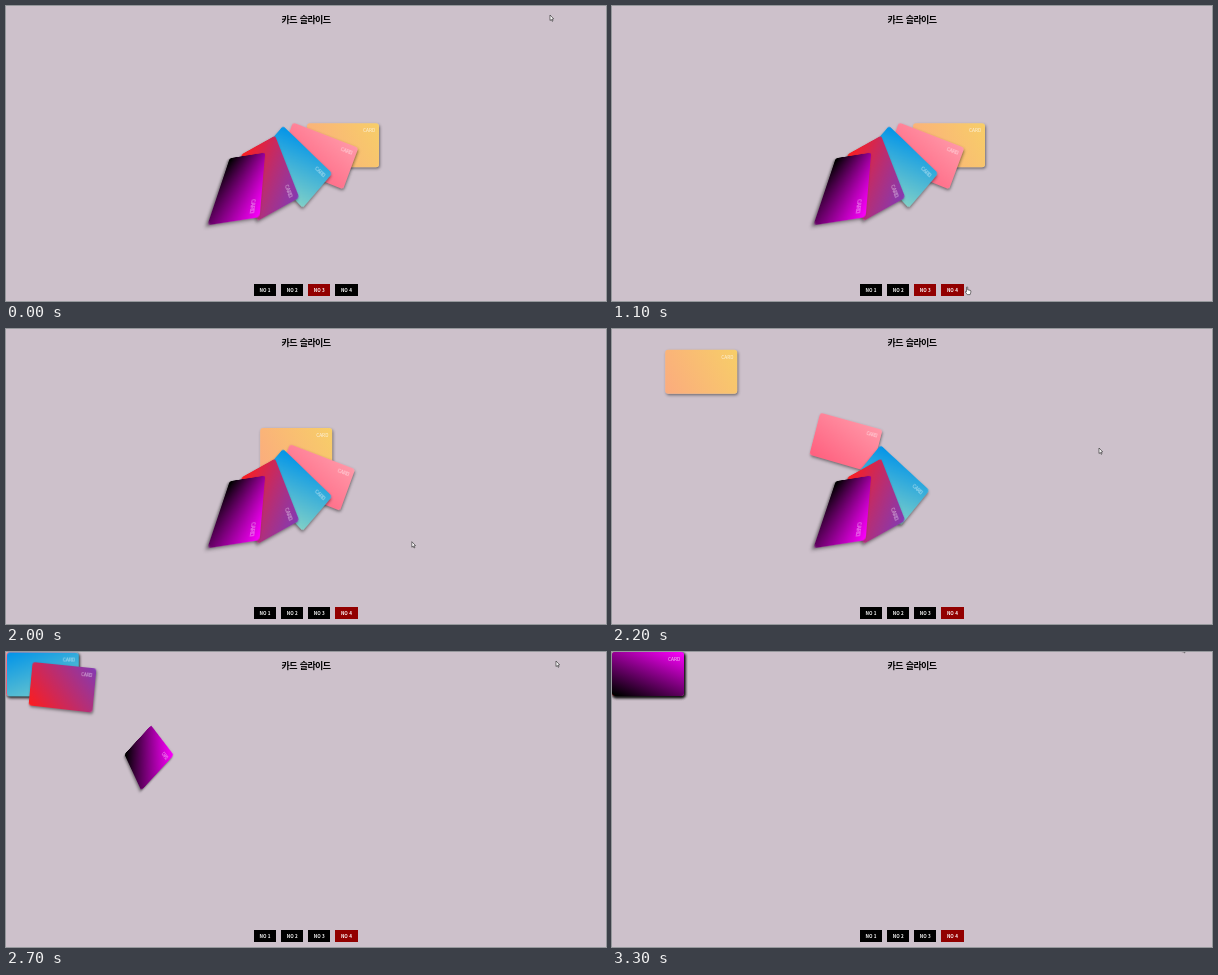
These frames come from a looping animation (600x295 px, 4000 ms). An HTML page:

```html
<!DOCTYPE html>
<html lang="ko">
<head>
<meta charset="utf-8">
<title>카드 슬라이드</title>
<style>
  html, body { margin: 0; width: 100%; height: 100%; overflow: hidden; background: #cdc1cb; }
  #stage { position: absolute; left: 0; top: 0; width: 600px; height: 295px; overflow: hidden; }
  h1 {
    position: absolute; left: 0; top: 7px; width: 600px; margin: 0; text-align: center;
    font: 700 9px/14px "Noto Sans CJK KR", "Noto Sans CJK", sans-serif;
    letter-spacing: -.6px; word-spacing: 1px; color: #000;
  }
  .card {
    position: absolute; left: 0; top: 0; width: 72px; height: 44px; border-radius: 3px;
    box-shadow: 1px 1.5px 3px rgba(0, 0, 0, .45);
  }
  .card span {
    position: absolute; right: 3.7px; top: 3.3px; color: rgba(255, 255, 255, .75);
    font: 300 4.8px/7px "Noto Sans CJK KR", "Noto Sans CJK", sans-serif;
  }
  .button {
    position: absolute; top: 277.7px; width: 22.4px; height: 12.4px; background: #000; color: #fff;
    font: 900 4.6px/12.4px "Noto Sans CJK KR", "Noto Sans CJK", sans-serif; text-align: center;
  }
  .button.on { background: #920000; }
  svg { position: absolute; left: 0; top: 0; }
</style>
</head>
<body>
<div id="stage">
  <h1>카드 슬라이드</h1>
  <svg width="600" height="295">
    <g id="cursor" fill="#fff" stroke="#222" stroke-width=".6" stroke-linejoin="round">
      <path id="arrow" d="M0 0V5.5L1.3 4.4 2.2 6.3 3 5.9 2.1 4.1 3.7 3.9Z"/>
      <path id="hand" d="M0 .4Q.6-.4 1.2.4V3L4 3.6Q4.6 4 4.3 5.4L3.6 7.8H.8L-1.2 5.2Q-1.2 4.2 0 4.8Z"/>
    </g>
  </svg>
</div>
<script>
const LOOP = 4000, STEP = 100, CLICK = 1700, HOVER = 1100, LEAVE = 1850;
const MOVE = { start: 1690, stagger: 150, duration: 830 };
const W = 72, H = 44;

const fills = [
  'linear-gradient(62deg, #fbab7e, #f7ce68)',
  'linear-gradient(20deg, #ff5f7e, #ff98a8)',
  'linear-gradient(160deg, #0093e9, #80d0c7)',
  'linear-gradient(45deg, #fd1d1d, #833ab4)',
  'linear-gradient(22deg, #000 4%, #f0f)',
];

const pointer = [
  { t: 0, x: 544, y: 9 },
  { t: 600, x: 402, y: 270 },
  { t: 1200, x: 345, y: 283 },
  { t: LEAVE, x: 345, y: 283 },
  { t: 2200, x: 487, y: 119 },
  { t: 2400, x: 533, y: 43 },
  { t: 2700, x: 550, y: 9 },
  { t: 3300, x: 570, y: -5.4 },
];

const stage = document.getElementById('stage');
const svg = stage.querySelector('svg');
const byId = id => document.getElementById(id);
const lerp = (a, b, p) => a + (b - a) * p;
const clamp = v => Math.min(1, Math.max(0, v));
const radians = degrees => degrees * Math.PI / 180;
const easeInOutQuart = u => u < .5 ? 8 * u ** 4 : 1 - 8 * (1 - u) ** 4;

function addBox(className) {
  const box = document.createElement('div');
  box.className = className;
  stage.insertBefore(box, svg);
  return box;
}

const cards = fills.map(fill => {
  const card = addBox('card');
  card.style.background = fill;
  card.innerHTML = '<span>CARD</span>';
  return card;
});

const buttons = [1, 2, 3, 4].map((n, i) => {
  const button = addBox('button');
  button.style.left = 247.9 + i * 27.1 + 'px';
  button.textContent = 'NO ' + n;
  return button;
});

// Card i starts fanned out by its index and flattens into the corner as p goes to 1.
function placeCard(card, i, p) {
  const left = 1 - p;
  const x = lerp(337 - 25.3 * i, W / 2, p);
  const y = lerp(139.3 + 10.5 * i - .33 * i * i, H / 2, p);
  const spin = 20.3 * i * left;
  const lean = 1.3 * i * i * (1 - p ** 3) ** 2;
  const ax = radians(spin + lean), ay = radians(spin);
  const sx = 1 - .025 * i * left - .42 * i * p * left;
  const sy = 1 - .007 * i * left;
  const depth = .024 * i * i * left;
  const matrix = [
    sx * Math.cos(ax), sx * Math.sin(ax), 0, -depth / W,
    -sy * Math.sin(ay), sy * Math.cos(ay), 0, 0,
    0, 0, 1, 0,
    0, 0, 0, 1,
  ].map(v => v.toFixed(6));
  card.style.transform = `translate(${x - W / 2}px, ${y - H / 2}px) matrix3d(${matrix})`;
}

function pointerAt(t) {
  const next = pointer.findIndex(key => key.t > t);
  const b = pointer.at(next);
  if (next < 0) return [b.x, b.y];
  const a = pointer[next - 1];
  const p = (t - a.t) / (b.t - a.t);
  return [lerp(a.x, b.x, p), lerp(a.y, b.y, p)];
}

function draw(t) {
  cards.forEach((card, i) => {
    const u = clamp((t - MOVE.start - i * MOVE.stagger) / MOVE.duration);
    placeCard(card, i, easeInOutQuart(u));
  });
  buttons[2].classList.toggle('on', t < CLICK);
  buttons[3].classList.toggle('on', t >= HOVER);
  const pointing = t >= HOVER && t < LEAVE;
  byId('cursor').setAttribute('transform', `translate(${pointerAt(t)})`);
  byId('hand').style.display = pointing ? '' : 'none';
  byId('arrow').style.display = pointing ? 'none' : '';
}

const begin = performance.now();
function tick() {
  const t = (performance.now() - begin) % LOOP;
  draw(Math.floor(t / STEP) * STEP);
  requestAnimationFrame(tick);
}
tick();
</script>
</body>
</html>
```
